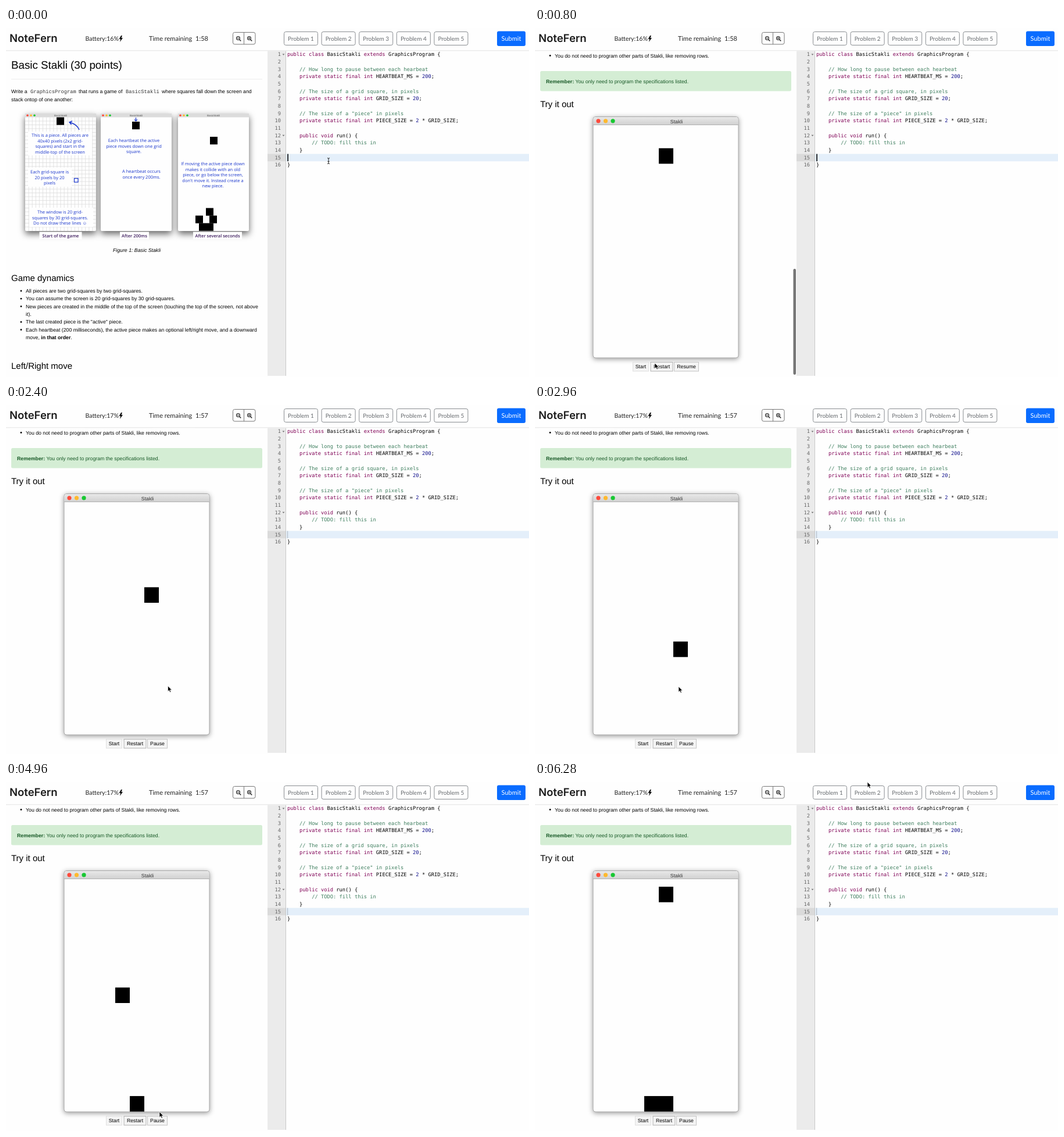
An HTML page for the animation above (6320 ms loop, 900x600 px).

```html
<!DOCTYPE html>
<html lang="en">
<head>
<meta charset="utf-8">
<title>NoteFern</title>
<style>
  html, body { margin: 0; width: 100%; height: 100%; overflow: hidden; background: #fefefe; }
  svg { display: block; }
  text { white-space: pre; text-rendering: geometricPrecision; }
  .body { font: 8.75px "Liberation Sans", sans-serif; }
  .code { font: 8.75px "DejaVu Sans Mono", monospace; }
  .inline { font: 8.75px "Liberation Mono", monospace; fill: #333; }
  .head { font: 11px Lato, sans-serif; }
  .note { font: 7.5px "Open Sans", sans-serif; fill: #1a36cc; text-anchor: middle; }
  .mid { text-anchor: middle; }
  .glow { filter: drop-shadow(0 2px 4px #0006); }
  .deep { filter: drop-shadow(0 5px 6px #0009); }
</style>
</head>
<body>
<svg id="stage" width="900" height="600" viewBox="0 0 900 600"></svg>
<script>
const LOOP = 6320, SCROLL = 1156, PAGE = '#fefefe';
const CLICK = 1440, DROP = 1520, BEAT = 80, FLOOR = 28;

const text = (x, y, s, cls = 'body', extra = '') => `<text x="${x}" y="${y}" class="${cls}" ${extra}>${s}</text>`;
const rect = (x, y, w, h, fill, extra = '') => `<rect x="${x}" y="${y}" width="${w}" height="${h}" fill="${fill}" ${extra}/>`;
const path = (d, stroke, w = 1, extra = '') => `<path d="${d}" fill="none" stroke="${stroke}" stroke-width="${w}" ${extra}/>`;
const size = px => `style="font-size:${px}px"`;
const lights = (x, y, gap, r) => ['#ff4a3c', '#ffb92e', '#18c832']
  .map((c, i) => `<circle cx="${x + i * gap}" cy="${y}" r="${r}" fill="${c}"/>`).join('');

function header() {
  let s = rect(0, 0, 900, 39, PAGE) + rect(0, 38, 900, 1.5, '#ececec');
  s += text(6, 24, 'NoteFern', 'head', 'style="font:600 18.5px Inter,sans-serif" fill="#1c1c1c"');
  s += text(136.5, 22, '', 'head', 'id="battery" style="font-size:10.6px" fill="#222"');
  s += '<path d="M198 13l-3.500 6h2.500l-1 5 5-7h-2.500l1.500-4z" fill="#111"/>';
  s += text(246, 22, 'Time remaining', 'head', 'fill="#222"') + text(326, 22, '', 'head', 'id="clock" fill="#222"');
  s += rect(390.5, 7.5, 38.5, 20.5, 'none', 'rx="3" stroke="#777"') + path('M409.500 7.500V28', '#777');
  for (const x of [400, 419]) {
    s += `<circle cx="${x - .5}" cy="17.500" r="2.900" fill="none" stroke="#333" stroke-width="1.300"/>`;
    s += path(`M${x + 1.8} 20l2.400 2.400`, '#333', 1.6) + path(`M${x - 2} 17.500h3`, '#333', .9);
  }
  s += path('M418.500 16v3', '#333', .9);
  for (let i = 0; i < 5; i++) {
    const x = 478.5 + i * 64.6;
    s += rect(x, 6.5, 58, 23, 'none', 'rx="3" stroke="#888c90"');
    s += text(x + 29, 21.5, 'Problem ' + (i + 1), 'head mid', size(10) + ' fill="#666a6e"');
  }
  return s + rect(845, 5.5, 49, 25.5, '#0a6cff', 'rx="3"') + text(869.5, 22, 'Submit', 'head mid', 'fill="#fff"');
}

const source = `public class BasicStakli extends GraphicsProgram {

    // How long to pause between each hearbeat
    private static final int HEARTBEAT_MS = 200;

    // The size of a grid square, in pixels
    private static final int GRID_SIZE = 20;

    // The size of a "piece" in pixels
    private static final int PIECE_SIZE = 2 * GRID_SIZE;

    public void run() {
        // TODO: fill this in
    }

}`;

function editor() {
  const paint = line => line.replace(
    /(\/\/.*)|\b(public|class|extends|private|static|final|int|void)\b|\b(\d+)\b/g,
    (m, note, key) => `<tspan fill="${note ? '#3f7f5f' : key ? '#7f0055' : '#10108c'}">${m}</tspan>`);
  let s = rect(450, 39.5, 32, 558.5, '#ebebeb') + rect(481, 39.5, 1, 558.5, '#c8c8c8');
  s += rect(450, 216.5, 31, 12.7, '#dadada') + rect(482, 216.5, 418, 12.7, '#e4effa');
  source.split('\n').forEach((line, i) => {
    const y = 48.4 + i * 12.67;
    s += text(473, y, i + 1, 'code', 'text-anchor="end" fill="#666"') + text(484, y, paint(line), 'code');
    if (i == 0 || i == 11) s += `<path d="M475.500 ${y - 4}h4l-2 2.500z" fill="#777"/>`;
  });
  return s + '<rect id="caret" x="484.300" y="216.500" height="12.700"/>';
}

function figure() {
  const notes = (x, y, ...lines) => lines.map((l, i) => text(x, y + i * 9.5, l, 'note')).join('');
  const piece = (x, y, w = 13) => rect(x, y, w, 13.2, '#000');
  let s = '', grid = '';
  const windows = [[33, 94, 'Start of the game', 73], [163, 221, 'After 200ms', 50], [296, 364, 'After several seconds', 84]];
  for (const [x] of windows) {
    s += `<g class="deep">${rect(x, 147, 122, 202, PAGE, 'rx="2"')}</g>` + rect(x, 147, 122, 6.5, '#dcdcdc');
    s += lights(x + 4, 150.3, 6, 1.8) + text(x + 61, 152, 'BasicStakli', 'body mid', 'style="font-size:4.500px" fill="#555"');
  }
  for (const [, cx, label, w] of windows) {
    s += rect(cx - w / 2, 350.5, w, 13, PAGE) + text(cx, 360, label, 'note', 'style="font-weight:600;fill:#3c1a5c"');
  }
  for (let i = 1; i < 20; i++) grid += `M${33 + i * 6.1} 153.500V349`;
  for (let i = 1; i < 30; i++) grid += `M33 ${153.5 + i * 6.5}h122`;
  s += path(grid, '#dcdcdc', .8);
  s += rect(38, 178, 110, 41, PAGE) + rect(38, 240, 75, 33, PAGE) + rect(40, 309, 110, 33, PAGE);
  s += piece(87, 153.5) + path('M126 175Q122 165 109 162M114 160l-5 2 3.500 4', '#1a36cc', 1.4);
  s += rect(117.5, 258.5, 6.5, 6.5, PAGE, 'stroke="#1a36cc" stroke-width="1.200"');
  s += notes(93, 187, 'This is a piece. All pieces are', '40x40 pixels (2x2 grid-', 'squares) and start in the', 'middle-top of the screen');
  s += notes(75, 250, 'Each grid-square is', '20 pixels by 20', 'pixels');
  s += notes(93, 319, 'The window is 20 grid-', 'squares by 30 grid-squares.', 'Do not draw these lines ☺');
  s += piece(217, 161) + path('M223.500 154v6M221 157.500l2.500 2.500 2.500-2.500', '#1a36cc', 1.2);
  s += notes(220, 196, 'Each heartbeat the active', 'piece moves down one grid', 'square.');
  s += notes(233, 249, 'A heartbeat occurs', 'once every 200ms.');
  s += piece(351, 187) + piece(344, 309.5) + piece(326, 322.5) + piece(350, 322.5) + piece(332, 335.5, 25);
  return s + notes(356, 236, 'If moving the active piece down', 'makes it collide with an old', 'piece, or go below the screen,', "don't move it. Instead create a", 'new piece.');
}

// A leading "+" marks a wrapped line without its own bullet.
const sections = [
  ['Game dynamics', 435, [
    'All pieces are two grid-squares by two grid-squares.',
    'You can assume the screen is 20 grid-squares by 30 grid-squares.',
    'New pieces are created in the middle of the top of the screen (touching the top of the screen, not above',
    '+it).', 'The last created piece is the "active" piece.',
    'Each heartbeat (200 milliseconds), the active piece makes an optional left/right move, and a downward',
    '+move, <tspan font-weight="bold">in that order</tspan>.']],
  ['Left/Right move', 586, [
    'The player can move the active piece left or right by one grid-square.',
    'At most one left/right move is made in each heartbeat.',
    'The piece must not leave the screen on either side.',
    'If the move would make the active piece collide with an old piece,', '+do not make the move.']],
  ['Downward move', 735, [
    'After the optional left/right move, the active piece moves down.',
    'The piece moves down by exactly one grid-square.',
    'If the move would make it collide with an old piece, or go below the screen,',
    '+do not move it. Instead create a new piece.', 'The new piece becomes the active piece.']],
  ['Collisions', 885, [
    'A collision happens when two pieces share a grid-square.',
    'Pieces that only touch at their edges do not collide.', 'Old pieces never move again.']],
  ['Notes', 1010, [
    'You can use any method of the graphics library.',
    'You do not need to handle the end of the game.',
    'Use the constants that are given in the starter code.',
    'The size of the window is already set for you.',
    'Pieces are always filled with black.']]
];

function page() {
  const bullet = (y, s) => s[0] == '+' ? text(34, y, s.slice(1))
    : `<circle cx="26" cy="${y - 3}" r="1.400"/>` + text(34, y, s);
  let s = text(9, 70, 'Basic Stakli (30 points)', 'body', size(18.75)) + rect(9, 87.5, 432, 1, '#eee');
  s += text(9, 112, 'Write a') + text(42, 112, 'GraphicsProgram', 'inline');
  s += text(125, 112, 'that runs a game of') + text(206, 112, 'BasicStakli', 'inline');
  s += text(268, 112, 'where squares fall down the screen and') + text(9, 126, 'stack ontop of one another:');
  s += figure() + text(225, 384.5, 'Figure 1: Basic Stakli', 'body mid', 'style="font-style:italic"');
  for (const [title, y, lines] of sections) {
    s += text(9, y, title, 'body', size(15));
    lines.forEach((l, i) => s += bullet(y + 20 + i * 13.35, l));
  }

  s += `<g transform="translate(0 ${SCROLL})">`;
  s += bullet(50.5, 'You do not need to program other parts of Stakli, like removing rows.');
  s += rect(9, 74, 432, 34.5, '#d4edd4', 'rx="2.500"');
  s += text(19, 94.5, '<tspan font-weight="bold">Remember:</tspan> You only need to program the specifications listed.', 'body', 'fill="#155724"');
  s += text(9, 136, 'Try it out', 'body', size(15));
  s += `<g class="glow">${rect(100, 152.5, 250, 414.5, PAGE, 'rx="4" stroke="#a8a8a8"')}</g>`;
  s += '<path d="M100.500 167v-10q0-4 4-4h241q4 0 4 4v10z" fill="url(#bar)"/>' + rect(100, 166, 250, 1, '#b0b0b0');
  s += lights(109, 159.8, 12.5, 3.6) + text(243.5, 163.5, 'Stakli', 'body mid', 'fill="#333"');
  s += '<g id="pieces"></g>';
  const button = (x, w, label, edge) => rect(x + .5, 574.5, w - 1, 15.5, '#f4f4f4', `stroke="${edge}"`) + text(x + w / 2, 585.3, label, 'body mid');
  const row = (id, x, last, w) => `<g id="${id}">${button(x, 28, 'Start', '#e0e0e0')}${button(x + 30.5, 39, 'Restart', '#b0b0b0')}${button(x + 71, w, last, '#c4c4c4')}</g>`;
  return s + row('paused', 168, 'Resume', 43) + row('running', 172, 'Pause', 35) + '</g>';
}

const stage = document.getElementById('stage');
stage.innerHTML = `<defs><clipPath id="pane">${rect(0, 39.5, 450, 558.5, '#000')}</clipPath>
  <linearGradient id="bar" x2="0" y2="1"><stop stop-color="#e8e8e8"/><stop offset="1" stop-color="#d0d0d0"/></linearGradient></defs>
  ${rect(0, 0, 900, 600, PAGE)}
  <g clip-path="url(#pane)"><g id="page">${page()}</g></g>
  ${rect(444.5, 0, 4.5, 182, '#757575', 'id="thumb" rx="2.200"')}
  ${editor()}${header()}
  <g id="beam">${path('M-2-4.500q2 0 2 1.500v7q0 1.500-2 1.500M2-4.500q-2 0-2 1.500M0 4q0 1.500 2 1.500M-1.500 1.500h3', '#222', 1)}</g>
  <path id="arrow" d="M0 0v9.500l2.200-2 1.500 3.500 1.700-.7-1.500-3.400h3z" stroke="#fff" stroke-width=".7"/>`;

const el = id => document.getElementById(id);
const show = (id, on) => el(id).setAttribute('visibility', on ? 'visible' : 'hidden');
const move = (id, x, y) => el(id).setAttribute('transform', `translate(${x} ${y})`);
const ease = p => (p = Math.min(1, Math.max(0, p)), p * p * (3 - 2 * p));

// Pointer stops: time, x, y
const stops = [[0, 555, 228], [80, 555, 228], [240, 320, 330], [600, 310, 345], [800, 206, 576], [1480, 212, 580],
  [1840, 310, 482], [2960, 247, 484], [3880, 144, 511], [4960, 264, 567], [5760, 330, 420], [6280, 572, 0]];
// Sideways steps: time, direction
const steps = [[1840, 1], [2320, 1], [3200, -1], [3520, -1], [4240, -1], [4640, -1]];

function pointer(t) {
  const i = Math.max(1, stops.findIndex(s => s[0] >= t));
  const [t0, x0, y0] = stops[i - 1], [t1, x1, y1] = stops[i];
  const p = ease((t - t0) / (t1 - t0));
  return [x0 + (x1 - x0) * p, y0 + (y1 - y0) * p];
}

function pieces(t) {
  const block = (col, row) => rect(100.5 + col * 12.5, 166.7 + row * 13.33, 25, 26.67, '#000');
  if (t < CLICK) return block(9, 3);
  const beat = Math.max(0, Math.floor((t - DROP) / BEAT));
  const turn = Math.floor(beat / (FLOOR + 1)), span = (FLOOR + 1) * BEAT;
  const column = n => steps.filter(s => s[0] <= t && Math.floor((s[0] - DROP) / span) == n)
    .reduce((c, s) => c + s[1], 9);
  let s = block(column(turn), beat % (FLOOR + 1));
  for (let n = 0; n < turn; n++) s += block(column(n), FLOOR);
  return s;
}

function draw() {
  const t = Math.floor(performance.now() % LOOP / 40) * 40;
  const p = ease((t - 160) / 480), late = t >= 1320, clicked = t >= CLICK;
  move('page', 0, -SCROLL * p);
  move('thumb', 0, 41 + 373 * p);
  el('thumb').setAttribute('opacity', t < 160 ? 0 : 1 - ease((t - 1080) / 240));
  el('battery').textContent = `Battery:${late ? 17 : 16}%`;
  el('clock').textContent = late ? '1:57' : '1:58';
  el('pieces').innerHTML = pieces(t);
  show('paused', !clicked);
  show('running', clicked);

  el('caret').setAttribute('width', clicked ? .8 : 1.6);
  el('caret').setAttribute('fill', clicked ? '#a0a8b0' : '#000');
  show('caret', clicked || t % 400 < 200);

  const [x, y] = pointer(t), beam = x > 484 && y > 40 && t < CLICK;
  move('beam', x, y);
  move('arrow', x, y);
  show('beam', beam);
  show('arrow', !beam);
  requestAnimationFrame(draw);
}
draw();
</script>
</body>
</html>
```
